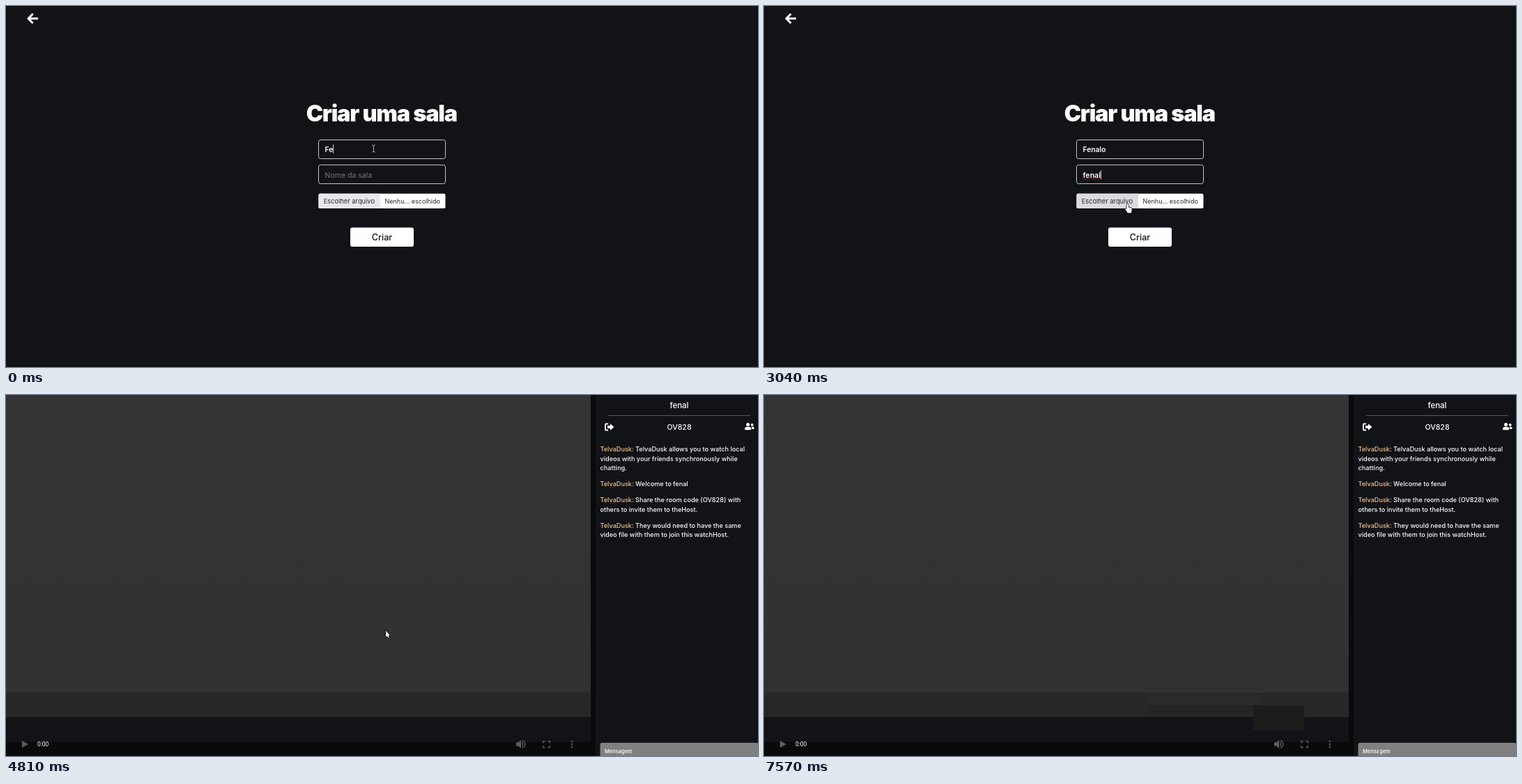
Write an HTML page with a canvas that moves like this. It is 1079x519 px and loops after 8000 ms.

```html
<!DOCTYPE html>
<html lang="pt">
<head>
<meta charset="utf-8">
<title>Criar uma sala</title>
<style>
  html, body { margin: 0; width: 100%; height: 100%; overflow: hidden; background: #121317; }
  canvas { display: block; }
</style>
</head>
<body>
<canvas id="stage" width="1079" height="519"></canvas>
<script>
const ctx = document.getElementById('stage').getContext('2d');
const LOOP = 8000, ROOM_AT = 4810;
const DARK = '#121317', WHITE = '#fff';
const USER = 'Fenalo', ROOM = 'fenal', BRAND = 'TelvaDusk:';

// Stepped tracks: each entry holds from its time until the next one.
const userTrack = [[0, 2], [250, 3], [370, 4], [490, 6]];
const roomTrack = [[0, 0], [1360, 1], [1480, 2], [1600, 3], [1720, 4], [1840, 5]];
const caretTrack = [[0, 'user'], [860, 'room'], [2320, ''], [2800, 'room'], [3550, ''],
  [4050, 'room'], [4170, ''], [6940, 'message'], [7570, '']];
const cursorTrack = [
  [0, 527, 205, 'beam'], [1240, 527, 211, 'beam'], [1360, 527, 218, 'beam'],
  [1480, 527, 229, 'beam'], [1600, 527, 245, 'beam'], [1720, 526, 272, 'hand'],
  [1840, 526, 293, 'arrow'], [1960, 526, 303, 'arrow'], [2080, 527, 309, 'arrow'],
  [2200, 529, 315, 'arrow'], [2320, 529, 316, 'arrow'], [2440, 528, 312, 'arrow'],
  [2560, 526, 304, 'arrow'], [2680, 524, 294, 'arrow'], [2800, 523, 288, 'hand'],
  [2920, 522, 286, 'hand'], [3040, 522, 285, 'hand'], [3550, 612, 297, 'arrow'],
  [4050, 590, 312, 'arrow'], [4170, 545, 339, 'hand'], [4810, 545, 339, 'arrow'],
  [5940, 570, 356, 'arrow'], [6060, 624, 394, 'arrow'], [6180, 678, 432, 'arrow'],
  [6300, 703, 447, 'arrow'], [6440, 765, 478, 'arrow'], [6560, 825, 505, 'arrow'],
  [6700, 852, 507, 'arrow'], [6820, 874, 511, 'beam'], [6940, 882, 511, 'beam']
];
const at = (track, t) => track.findLast(entry => entry[0] <= t);

function rect(x, y, w, h, color) {
  ctx.fillStyle = color;
  ctx.fillRect(x, y, w, h);
}

function round(x, y, w, h, r, color) {
  ctx.fillStyle = color;
  ctx.beginPath();
  ctx.roundRect(x, y, w, h, r);
  ctx.fill();
}

function text(str, x, y, size, { weight = 500, color = WHITE, align = 'left', spacing = 0, family = 'Inter' } = {}) {
  ctx.font = `${weight} ${size}px ${family}, sans-serif`;
  ctx.letterSpacing = spacing + 'px';
  ctx.textAlign = align;
  ctx.fillStyle = color;
  ctx.fillText(str, x, y);
  return ctx.measureText(str).width;
}

function shape(d, x, y, { fill, stroke, width = 1, blend = 'source-over' }) {
  const path = new Path2D(d);
  ctx.save();
  ctx.globalCompositeOperation = blend;
  ctx.translate(x, y);
  ctx.lineWidth = width;
  ctx.lineJoin = 'round';
  if (stroke) { ctx.strokeStyle = stroke; ctx.stroke(path); }
  if (fill) { ctx.fillStyle = fill; ctx.fill(path); }
  ctx.restore();
}

function field(y, h) {
  ctx.strokeStyle = '#c6c6c7';
  ctx.lineWidth = 1;
  ctx.beginPath();
  ctx.roundRect(448.5, y + .5, 182, h, 3);
  ctx.stroke();
}

function drawCursor([, x, y, kind]) {
  const outline = { fill: WHITE, stroke: '#000', width: 1.4 };
  if (kind === 'beam') {
    // The text cursor inverts what lies below it.
    shape('M-2 -5H-.7L.5 -4.2L1.7 -5H3M.5 -4.2V4.2M-2 5H-.7L.5 4.2L1.7 5H3', x, y,
      { stroke: WHITE, width: .7, blend: 'difference' });
  } else if (kind === 'hand') {
    shape('M-1.5 7V.8Q-1.5 -.4 -.3 -.4Q.9 -.4 .9 .8V4.4L4.6 5.2Q6 5.6 6 7L5.2 10.4V12.4H-.8V11.2L-3.6 7.6Q-4 6.2 -2.8 6.1Z', x, y, outline);
    shape('M2.3 6V8M4 6.3V8', x, y, { stroke: '#555', width: .5 });
  } else {
    shape('M0 0V9L2 7.2L3.4 10.3L4.9 9.6L3.5 6.6H6Z', x, y, outline);
  }
}

function drawForm(t) {
  rect(0, 0, 1079, 519, DARK);
  shape('M16 8H2.5M8.7 1.2L1.9 8L8.7 14.8', 30, 10, { stroke: WHITE, width: 2.9 });
  text('Criar uma sala', 538.8, 166, 32.5, { weight: 900, align: 'center', spacing: -1.2 });

  field(192, 27);
  field(228, 27);
  const user = USER.slice(0, at(userTrack, t)[1]);
  const room = ROOM.slice(0, at(roomTrack, t)[1]);
  const userEnd = 457.5 + text(user, 457.5, 210, 10.3, { weight: 600 });
  let roomEnd = 457.5;
  if (room) roomEnd += text(room, 457.5, 246.5, 10.6, { weight: 600 });
  else text('Nome da sala', 457.5, 246.5, 10.5, { weight: 400, color: '#75777b' });

  if (t >= 2920 && t < 4170) {
    let wave = 'M0 0';
    for (let x = 1; x < roomEnd - 457.5; x++) wave += `L${x} ${x % 2}`;
    shape(wave, 457.5, 248, { stroke: '#b3303a', width: .7 });
  }

  const caret = at(caretTrack, t)[1];
  if (caret === 'user') rect(Math.round(userEnd), 199, 1, 13, '#d0d0d1');
  if (caret === 'room') rect(Math.round(roomEnd), 236, 1, 13, '#d0d0d1');

  const cursor = at(cursorTrack, t);
  const hover = cursor[3] === 'hand' && cursor[2] < 291;
  round(448.5, 269.7, 182, 21.3, 2, WHITE);
  round(448.5, 269.7, 88.5, 21.3, [2, 0, 0, 2], hover ? '#dadce0' : '#e7e9ed');
  text('Escolher arquivo', 455.7, 284, 9.3, { weight: 400, color: '#24272b' });
  text('Nenhu... escolhido', 543.5, 284, 9, { weight: 400, color: '#24272b' });

  round(494, 318.6, 91, 27.4, 3, WHITE);
  text('Criar', 539.5, 336.7, 12.6, { weight: 500, color: DARK, align: 'center' });
  drawCursor(cursor);
}

function drawSpinner(t) {
  if (t >= 6060) return;
  const turn = (t - ROOM_AT) * .48 + 6;
  const angle = deg => (deg - 90) * Math.PI / 180;
  ctx.strokeStyle = '#272727';
  ctx.lineWidth = 2;
  ctx.beginPath();
  ctx.arc(420, 260.5, 19.5, angle(Math.max(0, turn - 50)), angle(turn));
  ctx.stroke();
}

function drawPlayer(t) {
  const shade = ctx.createLinearGradient(0, 0, 0, 428);
  shade.addColorStop(0, '#343434');
  shade.addColorStop(1, '#313131');
  rect(0, 0, 846, 519, '#090a0b');
  rect(0, 0, 839, 428, shade);
  rect(0, 428, 839, 35, '#272727');
  rect(0, 463, 839, 36, DARK);
  if (t >= 6300) {
    rect(550, 428, 160, 18, '#2a2a2a');
    rect(550, 446, 160, 11, '#242424');
  }
  if (t >= 6440) rect(702, 446, 73, 36, '#1c1c1d');

  const gray = '#5e5e5e';
  shape('M0 0L9 5L0 10Z', 23, 497, { fill: gray });
  text('0:00', 45, 505, 8.4, { weight: 400, family: 'Roboto' });
  shape('M0 3.5H3L7 0V12L3 8.5H0Z', 732, 496, { fill: gray });
  shape('M8.5 3.5Q10.8 6 8.5 8.5M8.5 .7Q12.8 2 12.8 6Q12.8 10 8.5 11.3', 732, 496, { stroke: gray, width: 1.4 });
  shape('M.7 3.5V.7H3.5M7.5 .7H10.3V3.5M10.3 7V9.8H7.5M3.5 9.8H.7V7', 770, 497, { stroke: gray, width: 1.4 });
  for (const y of [498, 502, 506]) round(810.6, y - 1.3, 2.6, 2.6, 1.3, gray);
  drawSpinner(t);
}

function drawChat(t) {
  rect(846, 0, 233, 519, DARK);
  text(ROOM, 966, 19, 11.4, { align: 'center' });
  rect(864, 29, 204, 1, '#56575a');
  text('OV828', 966, 49.5, 10.6, { align: 'center' });

  // Leave-room and members icons
  shape('M5 1H1.8Q.9 1 .9 2V9Q.9 10 1.8 10H5', 859, 40.5, { stroke: WHITE, width: 1.8 });
  shape('M4 3.6H8V.8L13.5 5.5L8 10.2V7.4H4Z', 859, 40.5, { fill: WHITE });
  round(1062, 40, 5, 5, 2.5, WHITE);
  round(1068.7, 41, 3.8, 3.8, 1.9, WHITE);
  round(1060, 45.7, 9, 4.6, [3, 3, 1, 1], WHITE);
  round(1069.8, 45.7, 3.8, 3.4, [0, 2, 1, 0], WHITE);

  const messages = [
    [81, 'TelvaDusk allows you to watch local', 'videos with your friends synchronously while', 'chatting.'],
    [131.3, 'Welcome to ' + ROOM],
    [154, 'Share the room code (OV828) with', 'others to invite them to theHost.'],
    [190.5, 'They would need to have the same', 'video file with them to join this watchHost.']
  ];
  for (const [y, first, ...rest] of messages) {
    const w = text(BRAND + ' ', 852.5, y, 9.15, { color: '#efc28d' });
    text(first, 852.5 + w, y, 9.15);
    rest.forEach((line, i) => text(line, 852.5, y + 13.7 * (i + 1), 9.15));
  }

  round(852.5, 500, 227, 19, [3, 3, 0, 0], '#808080');
  text('Mensagem', 859, 514.5, 7.5);
  if (at(caretTrack, t)[1] === 'message') rect(859, 505, 1, 12, WHITE);
}

function frame(now) {
  const t = now % LOOP;
  if (t < ROOM_AT) {
    drawForm(t);
  } else {
    drawPlayer(t);
    drawChat(t);
    drawCursor(at(cursorTrack, t));
  }
  requestAnimationFrame(frame);
}
requestAnimationFrame(frame);
</script>
</body>
</html>
```
